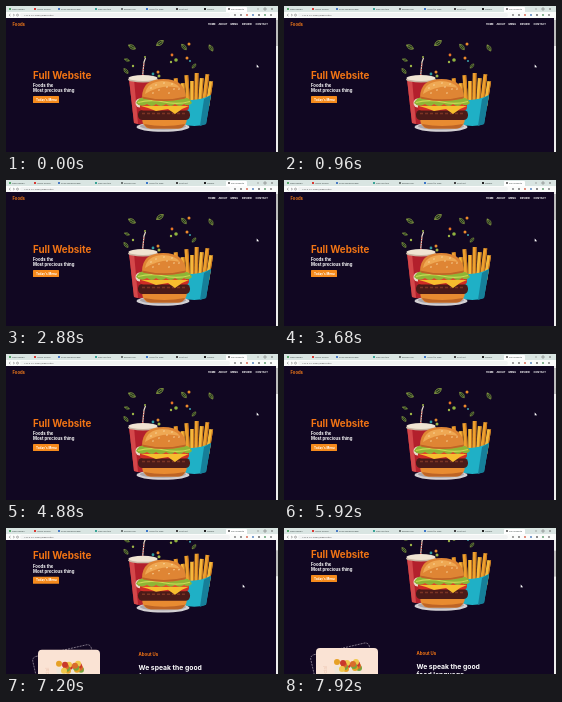
An HTML page for the animation above (8000 ms loop, 272 by 146 pixels).

```html
<!DOCTYPE html>
<html lang="en">
<head>
<meta charset="utf-8">
<title>Full Website</title>
<style>
  html, body { margin: 0; width: 100%; height: 100%; overflow: hidden; background: #110722; }
  svg { display: block; width: 100vw; height: 100vh; }
  text { font-family: Inter, Arial, sans-serif; font-weight: 700; }
  .small { font-family: Roboto, sans-serif; font-weight: normal; }
  .leaf { fill: #1b2a1e; stroke: #9db548; stroke-width: .6; }
</style>
</head>
<body>
<svg viewBox="0 0 272 146">
  <rect width="272" height="146" fill="#110722"/>

  <g id="page">
    <text x="6.5" y="20" font-size="4.2" fill="#f27a1a">Foods</text>
    <g id="nav" font-size="2.5" fill="#fff"></g>

    <text x="27" y="72.6" font-size="9.8" fill="#f27414">Full Website</text>
    <g font-size="4.25" fill="#fff">
      <text x="27" y="81">Foods the</text>
      <text x="27" y="86.2">Most precious thing</text>
    </g>
    <rect x="27" y="90" width="26" height="7" rx=".6" fill="#f58a1c"/>
    <text x="30" y="94.5" font-size="3" fill="#fff">Today's Menu</text>

    <g id="bits"></g>

    <!-- drink -->
    <path d="M136.5 71 138 56 139.5 52" fill="none" stroke="#e9dcc8" stroke-width="1.2"/>
    <path d="M136.7 69 138 56" stroke="#c33a3c" stroke-width="1.2" stroke-dasharray="1 1.6"/>
    <path d="M123 73H151L147 117Q137 120 128 117Z" fill="#b3202c"/>
    <path d="M123 73H128L132 118 128 117Z" fill="#d4474a"/>
    <path d="M144 73H151L147 117 142 118Z" fill="#7d1726"/>
    <circle cx="134" cy="97" r="4.5" fill="#ecd9c8"/>
    <circle cx="134" cy="97" r="2.2" fill="#c6363a"/>
    <ellipse cx="137" cy="73.5" rx="15" ry="3" fill="#c9b7a4"/>
    <ellipse cx="137" cy="72" rx="14.5" ry="3" fill="#f0e4d2"/>

    <!-- fries -->
    <g id="fries"></g>
    <path d="M174 92Q189 97 205 89L200 118Q188 122 177 118Z" fill="#1fb0c6"/>
    <path d="M198 93 205 89 200 118 194 120Z" fill="#167f99"/>

    <!-- burger -->
    <ellipse cx="157" cy="121" rx="26.5" ry="4.8" fill="#d3d0d3"/>
    <ellipse cx="157" cy="120.3" rx="23" ry="3.5" fill="#aaa5ab"/>
    <path d="M136 111H181Q181 122 172 122.5H144Q136 122 136 111Z" fill="#e88b31"/>
    <path d="M138 118Q158 122 179 118Q177 122.5 172 122.5H145Q140 122 138 118Z" fill="#bd6426"/>
    <rect x="132" y="104" width="52" height="10" rx="4.5" fill="#4b1b18"/>
    <path d="M136 107.5H181" stroke="#7b3424" stroke-width="1.4" stroke-dasharray="3 2"/>
    <rect x="134" y="97" width="49" height="7.5" rx="3.5" fill="#cf2d25"/>
    <path d="M135 100H183L176 103 169 108 162 103 150 105 142 102Z" fill="#f7bd2e"/>
    <path d="M136 99H180" stroke="#e6512f" stroke-width="1.5"/>
    <path d="M130 97Q133 90 141 91H175Q184 91 186 97Q182 101 178 98Q174 102 169 98Q165 102 160 98Q155 102 150 98Q146 102 141 98Q135 102 130 97Z" fill="#8fb535"/>
    <path d="M132 96.5Q145 93 158 96T184 95.5" fill="none" stroke="#c9da55" stroke-width="1.2"/>
    <path d="M136 91.5Q136 73 157.5 73T180 91.5Q170 95 158 95T136 91.5Z" fill="#df8534"/>
    <path d="M139 88Q141 76 156 75Q169 75 174 82Q156 77 139 88Z" fill="#efa853"/>
    <path d="M136 90.5Q158 96 180 90.5Q180 92.5 177 93Q158 97 139 93Q136 92.5 136 90.5Z" fill="#bf6426"/>
    <g id="seeds" fill="#fbe3b0"></g>

    <!-- about -->
    <rect x="33" y="163" width="60" height="70" rx="4" fill="none" stroke="#ddd3dc" stroke-width=".5" stroke-dasharray="2 1" transform="rotate(-13 63 198)"/>
    <rect x="32" y="163" width="62" height="72" rx="4" fill="#fae3d4"/>
    <text class="small" font-size="5" fill="#edc7b4" transform="translate(43 197) rotate(-90)">Special</text>
    <path d="M50 181H78L75 202H53Z" fill="#eee5d9"/>
    <g id="salad"></g>
    <text x="132.5" y="169.5" font-size="4.4" fill="#f27414">About Us</text>
    <g font-size="6.8" fill="#fff">
      <text x="132.5" y="183.7">We speak the good</text>
      <text x="132.5" y="192">food language</text>
    </g>
  </g>

  <!-- browser -->
  <rect width="272" height="6" fill="#d9e5e2"/>
  <rect x="220" y="1" width="21" height="6" rx="1" fill="#fff"/>
  <rect y="6" width="272" height="6" fill="#fbfcfb"/>
  <rect x="14" y="7" width="210" height="4" rx="2" fill="#f1f3f3"/>
  <g id="tabs" class="small" font-size="2.4" fill="#44504e"></g>
  <text class="small" x="18" y="9.9" font-size="2.5" fill="#555">127.0.0.1:5500/index.html</text>
  <path d="M4.5 8 3 9.1 4.5 10.2M7 8 8.5 9.1 7 10.2M251 3H253M258 2H260V4H258ZM265 2 267 4M267 2 265 4" fill="none" stroke="#666" stroke-width=".5"/>
  <circle cx="11.5" cy="9.1" r="1" fill="none" stroke="#666" stroke-width=".5"/>
  <g id="icons"></g>

  <rect x="270" y="12" width="2" height="134" fill="#eeeeee"/>
  <rect id="thumb" x="270" y="14" width="2" height="26" fill="#bdbdbd"/>
  <path id="cursor" d="M0 0V3L.8 2.4 1.3 3.4 1.8 3.1 1.4 2.2H2.2Z" fill="#fff"/>
</svg>
<script>
const $ = id => document.getElementById(id);
const fill = (id, items, draw) => $(id).innerHTML = items.map(draw).join('');
const move = (id, x, y) => $(id).setAttribute('transform', `translate(${x} ${y})`);
const dot = ([x, y, r, c]) => `<circle cx="${x}" cy="${y}" r="${r}" fill="${c}"/>`;
const leaf = ([x, y, a, s]) => `<g transform="translate(${x} ${y}) rotate(${a}) scale(${s})">
  <path class="leaf" d="M-4 0Q0 -4 4 0Q0 4 -4 0ZM-4 0H3"/></g>`;

fill('nav', [[202, 'HOME'], [212.5, 'ABOUT'], [224.5, 'MENU'], [236, 'REVIEW'], [249.5, 'CONTACT']],
  ([x, s]) => `<text x="${x}" y="19.4">${s}</text>`);

const leaves = [[154, 37, -35, 1.05], [126, 41, 30, 1], [178, 41, 50, .9], [205, 42, 60, .9], [121, 54, 20, .7], [120, 65, 50, .8], [188, 60, -50, .7]];
const dots = [
  [183, 38, 1.5, '#ed8b2c'], [166, 49, 1.4, '#e87527'], [170, 54, 1.8, '#8fb23f'], [181, 52, 1.5, '#ed8b2c'],
  [184, 55, 1, '#3ba5ac'], [139, 51, 1, '#9db548'], [165, 56, 1.2, '#9db548'], [127, 60, 1.2, '#9db548'],
  [147, 68, 1.4, '#2f9d9d'], [152, 66, 1.5, '#e58a30'], [153, 70, 1.5, '#9db548']
];
$('bits').innerHTML = leaves.map(leaf).join('') + dots.map(dot).join('');

const fries = [[173, 72, -9], [178, 77, -5], [182, 69, -4], [186, 75, 0], [190, 67, 1], [194, 72, 4], [198, 68, 7], [202, 75, 9]];
fill('fries', fries, ([x, y, a], i) => `<g transform="rotate(${a} ${x} 95)">
  <rect x="${x - 1.8}" y="${y}" width="3.8" height="${100 - y}" fill="${i % 2 ? '#f6b83b' : '#eda02e'}"/>
  <rect x="${x + 1}" y="${y}" width="1" height="${100 - y}" fill="#c9761f"/></g>`);

fill('seeds', [[145, 82], [150, 79], [153, 84], [158, 77], [161, 81], [166, 78], [168, 83], [173, 83], [147, 87], [163, 87]],
  ([x, y]) => `<ellipse cx="${x}" cy="${y}" rx=".9" ry=".5" transform="rotate(-20 ${x} ${y})"/>`);

const food = ['#e6a126', '#c9382b', '#76a33b', '#f0c84c', '#d96c2b'];
fill('salad', [...Array(15).keys()],
  i => dot([53 + i * 11 % 23, 177 + i * 3 % 8, 3, food[i % 5]]));

const tabs = [
  [3, 'New design', '#55a66a'], [28, 'Video lesson', '#d83a34'], [52, 'Food landing page', '#4b7bc4'],
  [89, 'Free vectors', '#3aa497'], [115, 'Burger png', '#6f7775'], [140, 'Icons for web', '#3c77c9'],
  [170, 'Font list', '#444'], [198, 'Sliders', '#222'], [222, 'Full Website', '#777']
];
fill('tabs', tabs, ([x, s, c]) => `<rect x="${x}" y="2" width="2" height="2" fill="${c}"/>
  <text class="small" x="${x + 3}" y="3.9">${s}</text>`);
fill('icons', ['#777', '#666', '#d65a42', '#4476b8', '#555', '#519363', '#777'],
  (c, i) => dot([229 + i * 6, 9, .9, c]));

const ease = (t, from, to) => {
  const p = Math.min(1, Math.max(0, (t - from) / (to - from)));
  return p * p * (3 - 2 * p);
};

function draw(now) {
  const t = now % 8000;
  const scroll = 43 * ease(t, 6920, 7240);
  const aim = ease(t, 6240, 6900);
  move('page', 0, -scroll);
  move('thumb', 0, scroll * .2);
  move('cursor', 250.7 - 14 * aim, 58.5 - 2 * aim);
  requestAnimationFrame(draw);
}
requestAnimationFrame(draw);
</script>
</body>
</html>
```
